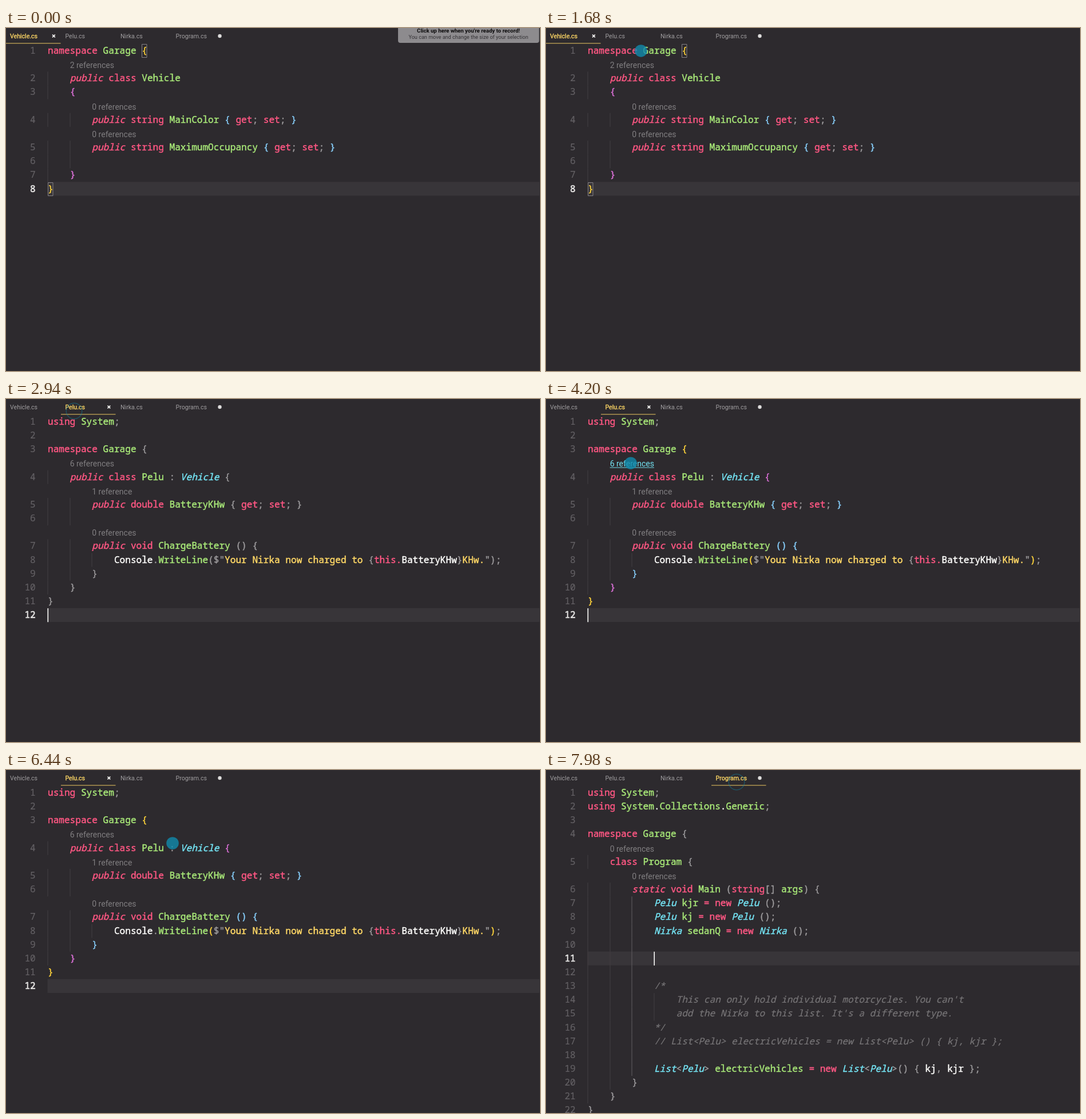
An HTML page with a canvas for the animation above (8 s loop, 933 px wide and 600 px high).

```html
<!DOCTYPE html>
<html lang="en">
<head>
<meta charset="utf-8">
<title>Code editor walkthrough</title>
<style>
html, body { margin: 0; width: 100%; height: 100%; overflow: hidden; background: #2d2a2e; }
canvas { display: block; }
</style>
</head>
<body>
<canvas id="stage" width="933" height="600"></canvas>
<script>
const ctx = document.getElementById('stage').getContext('2d');
const LOOP = 8000, LEFT = 73, TOP = 28, ROW = 24.15, FONT_SIZE = 16.1, COL = FONT_SIZE * 0.6;
const MONO = `${FONT_SIZE}px "Noto Sans Mono", monospace`;
const SANS = 'Roboto, "Noto Sans", sans-serif';
const YELLOW = '#ffd866', GREY = '#9b999b', LINK = '#74e4f4';

// Style letter -> colour; i, t and c are slanted; 1 to 3 are bracket depths.
const COLORS = {
  k: '#ff5783', i: '#ff5783', g: '#a8e878', t: LINK, d: GREY, w: '#fcfcfa',
  y: YELLOW, c: '#777577', 1: '#ffd43b', 2: '#da70d6', 3: '#87cefa'
};
const SLANTED = 'itc';

// A line is "indent|Xtext|Xtext", X being the style; "@" starts a reference hint.
const property = (type, name) =>
  `        |ipublic |k${type} |g${name} |3{ |kget|d; |kset|d; |3}`;

const vehiclePage = {
  tab: 0, active: 10, cursorCol: 1, boxes: [[17, 0], [0, 10]],
  lines: [
    '|knamespace |gGarage |1{',
    '    @2 references',
    '    |ipublic |kclass |gVehicle',
    '    |2{',
    '        @0 references',
    property('string', 'MainColor'),
    '        @0 references',
    property('string', 'MaximumOccupancy'),
    '        ',
    '    |2}',
    '|1}'
  ]
};

const bikePage = {
  tab: 1, active: 14, cursorCol: 0,
  lines: [
    '|kusing |gSystem|d;',
    '',
    '|knamespace |gGarage |1{',
    '    @6 references',
    '    |ipublic |kclass |gPelu |d: |tVehicle |2{',
    '        @1 reference',
    property('double', 'BatteryKHw'),
    '        ',
    '        @0 references',
    '        |ipublic |kvoid |gChargeBattery |3() {',
    '            |wConsole|d.|gWriteLine|1(|d$"|yYour Nirka now charged to |d{|kthis.|wBatteryKHw|d}|yKHw.|d"|1)|d;',
    '        |3}',
    '    |2}',
    '|1}',
    ''
  ]
};

const create = (type, name) => `            |t${type} |g${name} |k= new |t${type} |d();`;

const programPage = {
  tab: 3, active: 12, cursorCol: 12, activeGuide: 8,
  lines: [
    '|kusing |gSystem|d;',
    '|kusing |gSystem|w.|gCollections|w.|gGeneric|d;',
    '',
    '|knamespace |gGarage |d{',
    '    @0 references',
    '    |kclass |gProgram |d{',
    '        @0 references',
    '        |istatic |kvoid |gMain |d(|kstring|d[] |gargs|d) {',
    create('Pelu', 'kjr'),
    create('Pelu', 'kj'),
    create('Nirka', 'sedanQ'),
    '            ',
    '            ',
    '            ',
    '            |c/*',
    "                |cThis can only hold individual motorcycles. You can't",
    "                |cadd the Nirka to this list. It's a different type.",
    '            |c*/',
    '            |c// List<Pelu> electricVehicles = new List<Pelu> () { kj, kjr };',
    '            ',
    '            |tList|d<|tPelu|d> |gelectricVehicles |k= new |tList|d<|tPelu|d>() { |wkj|d, |wkjr |d};',
    '        |d}',
    '    |d}',
    '|d}'
  ]
};

const TABS = ['Vehicle.cs', 'Pelu.cs', 'Nirka.cs', 'Program.cs'];
const OPEN_BIKE = 2800, OPEN_PROGRAM = 7840, COLORIZE = 3920, RIPPLE = 420;

// Pointer path: time, x, y
const PATH = [
  [700, 566, 318], [840, 545, 240], [980, 520, 148], [1120, 520, 148],
  [1260, 455, 125], [1680, 166, 40], [2100, 119, 21], [3780, 119, 21],
  [4200, 148, 112], [4760, 198, 212], [5180, 198, 212], [5600, 207, 208],
  [5740, 211, 208], [6020, 211, 208], [6440, 291, 128], [6580, 291, 128],
  [7140, 328, 26], [7560, 333, 21]
];

function pointerAt(t) {
  if (t < PATH[0][0]) return null;
  const next = PATH.findIndex(key => key[0] > t);
  if (next < 0) return PATH[PATH.length - 1].slice(1);
  const [t0, x0, y0] = PATH[next - 1], [t1, x1, y1] = PATH[next];
  const p = (t - t0) / (t1 - t0);
  return [x0 + (x1 - x0) * p, y0 + (y1 - y0) * p];
}

// A thin outline of the same colour thickens the letters.
function text(str, x, y, color, font, { align = 'left', outline = 0 } = {}) {
  ctx.font = font;
  ctx.textAlign = align;
  ctx.fillStyle = color;
  ctx.fillText(str, x, y);
  if (!outline) return;
  ctx.strokeStyle = color;
  ctx.lineWidth = outline;
  ctx.lineJoin = 'round';
  ctx.strokeText(str, x, y);
}

function rect(x, y, w, h, color) {
  ctx.fillStyle = color;
  ctx.fillRect(x, y, w, h);
}

function circle(x, y, r, color, stroked) {
  ctx.beginPath();
  ctx.arc(x, y, r, 0, Math.PI * 2);
  if (stroked) {
    ctx.strokeStyle = color;
    ctx.lineWidth = 1.5;
    ctx.stroke();
  } else {
    ctx.fillStyle = color;
    ctx.fill();
  }
}

function drawTabs(active) {
  TABS.forEach((name, i) => {
    const x = i * 96.5, isActive = i === active;
    text(name, x + 7, 17.5, isActive ? YELLOW : '#a09ea0', `10.6px ${SANS}`, { outline: isActive ? 0.35 : 0 });
    if (!isActive) return;
    rect(Math.round(x) - (i ? 1 : 0), 26.4, 95.5, 0.9, YELLOW);
    if (i === 3) return;
    ctx.strokeStyle = '#fcfcfa';
    ctx.lineWidth = 1.5;
    ctx.beginPath();
    for (const s of [-1, 1]) {
      ctx.moveTo(x + 81, 14 - 2.4 * s);
      ctx.lineTo(x + 85.8, 14 + 2.4 * s);
    }
    ctx.stroke();
  });
  circle(373.5, 14, 3.2, '#dedddc');
}

function drawHint(label, x, y, pointer) {
  const font = `14px ${SANS}`;
  ctx.font = font;
  const width = ctx.measureText(label).width;
  const hovered = pointer && Math.abs(pointer[1] - y + 5) < 12 &&
    pointer[0] > x && pointer[0] < x + width;
  text(label, x, y, hovered ? LINK : '#807e80', font);
  if (hovered) rect(x, y + 2, width, 1, LINK);
}

function drawCode(line, y, colorized) {
  const [indent, ...tokens] = line.split('|');
  let col = indent.length;
  for (const token of tokens) {
    const style = token[0], body = token.slice(1);
    const color = style in [0, 1, 2, 3] && !colorized ? GREY : COLORS[style];
    const slant = SLANTED.includes(style) ? 'italic ' : '';
    const weight = style === 'c' ? '400 ' : '500 ';
    text(body, LEFT + col * COL, y, color, slant + weight + MONO, { outline: style === 'c' ? 0.2 : 0.45 });
    col += body.length;
  }
}

function drawPage(page, colorized, cursorOn, pointer) {
  const activeTop = TOP + page.active * ROW;
  rect(LEFT - 0.5, activeTop - 0.3, 932.5 - LEFT, ROW, '#383539');
  let number = 0;
  page.lines.forEach((line, row) => {
    const y = Math.round(TOP + 17 + row * ROW);
    const [indent, hint] = line.split('@');
    if (hint) {
      drawHint(hint, LEFT + indent.length * COL, y + 0.5, pointer);
      return;
    }
    const depth = line.split('|')[0].length;
    for (let col = 0; col < depth; col += 4) {
      const color = col === page.activeGuide ? '#625f63' : '#423f43';
      rect(Math.round(LEFT + col * COL) - 0.5, TOP + row * ROW, 1, ROW, color);
    }
    const isActive = row === page.active;
    text(++number, 51.7, y, isActive ? '#e8e7e6' : '#636064', MONO,
      { align: 'right', outline: isActive ? 0.6 : 0.2 });
    drawCode(line, y, colorized);
  });
  ctx.strokeStyle = '#858286';
  ctx.lineWidth = 1;
  for (const [col, row] of page.boxes || []) {
    ctx.strokeRect(Math.round(LEFT + col * COL) + 0.5, Math.round(TOP + row * ROW) + 0.5, 8.5, 23);
  }
  if (cursorOn) rect(LEFT + page.cursorCol * COL - 0.5, activeTop, 1.6, ROW, '#fcfcfa');
}

function drawBanner() {
  ctx.fillStyle = '#8d8b8e';
  ctx.beginPath();
  ctx.roundRect(685, -6, 246.5, 32, 4);
  ctx.fill();
  const center = { align: 'center' };
  text("Click up here when you're ready to record!", 808, 7.6, '#0c0b0c', `bold 9.6px ${SANS}`, center);
  text('You can move and change the size of your selection', 808, 19, '#353336', `9.1px ${SANS}`, center);
}

function drawPointer(t, pointer) {
  if (!pointer) return;
  const age = t - (t >= OPEN_PROGRAM ? OPEN_PROGRAM : OPEN_BIKE);
  if (age >= 0 && age < RIPPLE) {
    const fade = 0.6 * (1 - age / RIPPLE);
    circle(...pointer, 11 + age * 0.02, `rgba(16, 139, 173, ${fade})`, true);
  } else {
    circle(...pointer, 10.8, 'rgba(16, 139, 173, 0.8)');
  }
}

function render(t) {
  const page = t < OPEN_BIKE ? vehiclePage : t < OPEN_PROGRAM ? bikePage : programPage;
  const blinkStart = t < OPEN_BIKE ? 160 : t < OPEN_PROGRAM ? OPEN_BIKE : OPEN_PROGRAM;
  const cursorOn = (t - blinkStart + LOOP) % 1000 < 500;
  const pointer = pointerAt(t);
  rect(0, 0, 933, 600, '#2d2a2e');
  drawTabs(page.tab);
  drawPage(page, page !== bikePage || t >= COLORIZE, cursorOn, pointer);
  if (t < 140) drawBanner();
  drawPointer(t, pointer);
}

const start = performance.now();
function tick() {
  render((performance.now() - start) % LOOP);
  requestAnimationFrame(tick);
}
tick();
</script>
</body>
</html>
```
